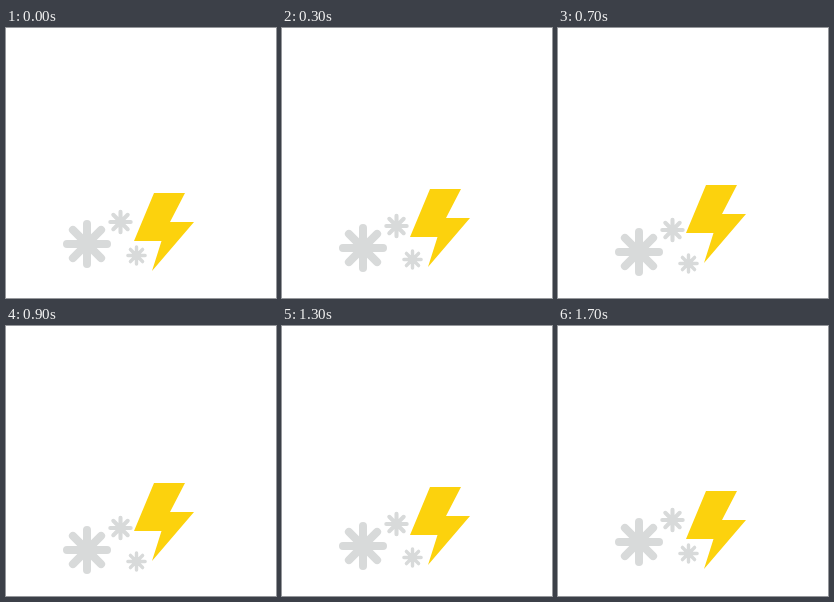
Animation, 270 px wide and 270 px high, one loop 1800 ms. Source, as an HTML page:

```html
<!DOCTYPE html>
<html>
<head>
<meta charset="utf-8">
<style>
  html, body { margin: 0; width: 100%; height: 100%; overflow: hidden; background: #fff; }
  svg { display: block; width: 100%; height: 100%; }
</style>
</head>
<body>
<svg viewBox="0 0 270 270">
  <defs>
    <path id="flake" d="M0-20V20M-20 0H20M-14.1-14.1 14.1 14.1M-14.1 14.1 14.1-14.1"
          stroke="#d8dada" stroke-width="8" stroke-linecap="round"/>
  </defs>
  <g id="snow">
    <use href="#flake" transform="translate(81 216)"/>
    <use href="#flake" transform="translate(114.5 194) scale(.51)"/>
    <use href="#flake" transform="translate(130.5 227.5) scale(.43)"/>
  </g>
  <path id="bolt" fill="#fcd20d" d="M148 165H179L164 194H188L146 243L155.500 213H128Z"/>
</svg>
<script>
  const LOOP = 1800, STEP = 100;
  const snow = document.getElementById('snow');
  const bolt = document.getElementById('bolt');

  // One pixel per step up to the peak and back; the loop rests for one extra step.
  function offset(step) {
    return step === 0 ? 0 : 9 - Math.abs(step - 8);
  }

  function draw() {
    const d = offset(Math.floor(performance.now() % LOOP / STEP));
    snow.setAttribute('transform', `translate(0 ${d})`);
    bolt.setAttribute('transform', `translate(0 ${-d})`);
    requestAnimationFrame(draw);
  }
  draw();
</script>
</body>
</html>
```
